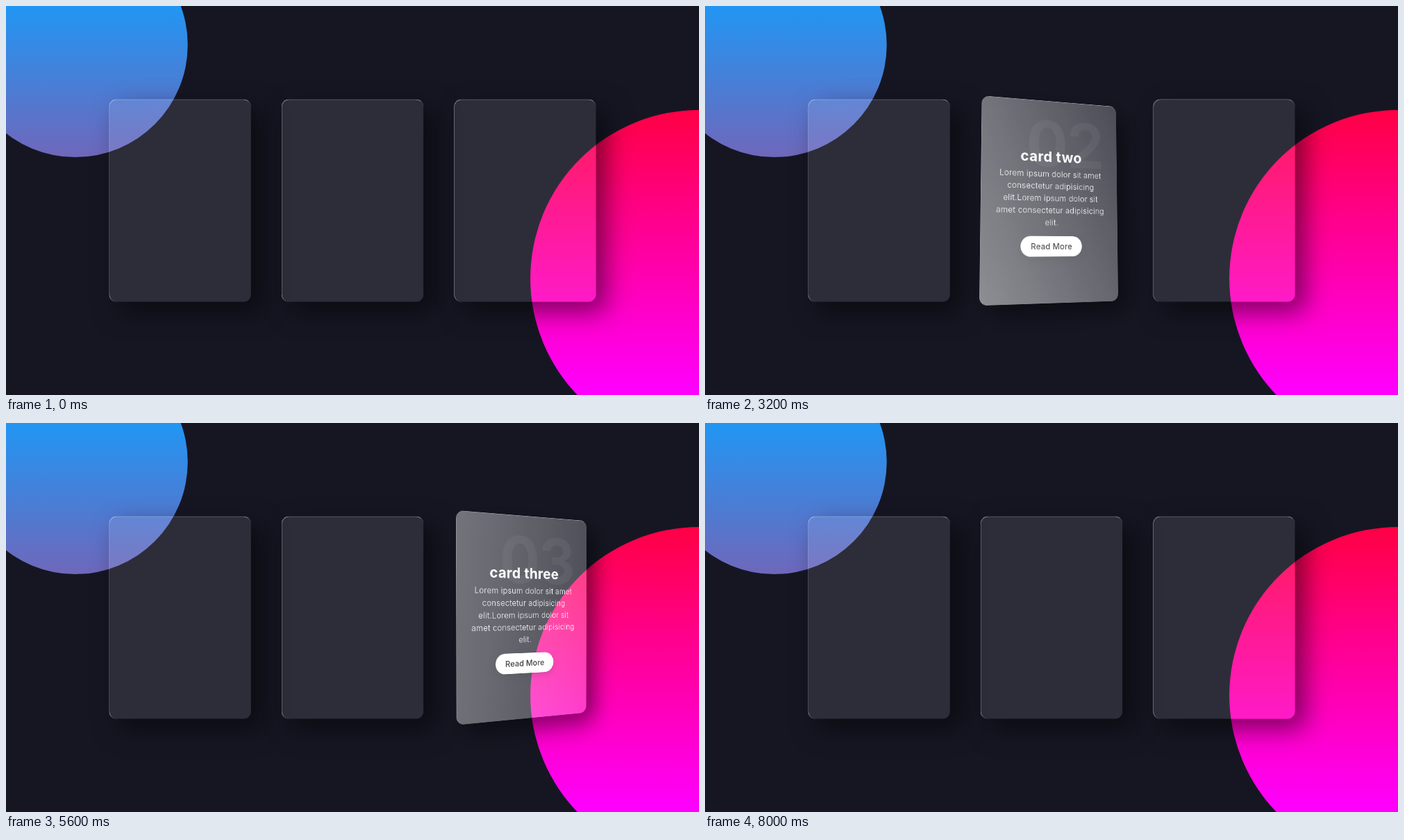
These frames come from a looping animation (998x561 px, 8.8 s). An HTML page:

```html
<!DOCTYPE html>
<html lang="en">
<head>
<meta charset="utf-8">
<title>Tilting glass cards</title>
<style>
  * { margin: 0; padding: 0; box-sizing: border-box; }
  html, body { width: 100%; height: 100%; overflow: hidden; background: #161623; }
  body { font-family: Inter, "Open Sans", sans-serif; }

  /* Laid out at 1366 x 768, shown at 998 x 561 */
  #stage {
    position: absolute; left: 0; top: 0; width: 1366px; height: 768px;
    transform: scale(calc(998 / 1366)); transform-origin: 0 0;
    display: flex; justify-content: center; align-items: center;
    background: #161623; overflow: hidden;
  }
  .disc { position: absolute; inset: 0; }
  .pink { background: linear-gradient(#f00, #f0f); clip-path: circle(30% at right 70%); }
  .blue { background: linear-gradient(#2196f3, #e91e63); clip-path: circle(20% at 10% 10%); }

  .card {
    position: relative; flex: none; width: 280px; height: 400px; margin: 30px;
    display: flex; justify-content: center; align-items: center;
    border-radius: 15px; background: rgba(255, 255, 255, .1);
    border-top: 1px solid rgba(255, 255, 255, .5);
    border-left: 1px solid rgba(255, 255, 255, .5);
    box-shadow: 20px 20px 50px rgba(0, 0, 0, .5);
  }
  .content { position: relative; width: 100%; padding: 20px 0; text-align: center; line-height: 1.5; white-space: nowrap; }
  h2 {
    position: absolute; top: -80px; right: 30px;
    font-size: 128px; font-weight: 700; letter-spacing: -.02em;
    color: rgba(255, 255, 255, .05);
  }
  h3 { position: relative; font-size: 28.8px; font-weight: 700; letter-spacing: .5px; color: #fff; }
  p { position: relative; font-size: 16px; font-weight: 300; line-height: 24px; letter-spacing: .3px; color: #fff; }
  .more {
    position: relative; display: inline-block; vertical-align: top;
    margin-top: 15px; padding: 8px 20px; border-radius: 20px;
    font-size: 16px; font-weight: 500; line-height: 24px; letter-spacing: .2px;
    color: #000; background: #fff; box-shadow: 0 5px 15px rgba(0, 0, 0, .2);
  }
  .glare { position: absolute; inset: 0; overflow: hidden; border-radius: 14px; }
  .glare i {
    position: absolute; left: 50%; top: 50%; width: 800px; height: 800px;
    transform-origin: 0 0; background: linear-gradient(0deg, rgba(255, 255, 255, 0), #fff);
  }
</style>
</head>
<body>
<div id="stage">
  <div class="disc pink"></div>
  <div class="disc blue"></div>
</div>
<script>
const STEP = 800, MAX_TILT = 25, WIDTH = 280, HEIGHT = 400;

// One pose per step: [card, tilt about x, tilt about y] in degrees, or null at rest
const poses = [
  null,
  [0, -5, 12], [0, 5, 4], [0, 16, -6],
  [1, 5, 16.4], [1, 3, -3], [1, -4.5, -23],
  [2, -1, 24], [2, 4, 6], [2, 4.5, -10.5],
  null
];

const stage = document.getElementById('stage');
const cards = ['one', 'two', 'three'].map((name, i) => {
  const card = document.createElement('div');
  card.className = 'card';
  card.innerHTML = `
    <div class="content">
      <h2>0${i + 1}</h2>
      <h3>card ${name}</h3>
      <p>Lorem ipsum dolor sit amet<br>consectetur adipisicing<br>elit.Lorem ipsum dolor sit<br>amet consectetur adipisicing<br>elit.</p>
      <span class="more">Read More</span>
    </div>
    <div class="glare"><i></i></div>`;
  stage.append(card);
  return {
    card,
    content: card.querySelector('.content'),
    glare: card.querySelector('.glare i')
  };
});

function tilt({ card, content, glare }, tiltX, tiltY) {
  // The pointer position follows from the tilt and aims the glare
  const x = -tiltY / (2 * MAX_TILT), y = tiltX / (2 * MAX_TILT);
  const angle = Math.atan2(x * WIDTH, -y * HEIGHT);
  card.style.transform = `perspective(1000px) rotateX(${tiltX}deg) rotateY(${tiltY}deg)`;
  content.style.opacity = 1;
  glare.style.transform = `rotate(${angle}rad) translate(-50%, -50%)`;
  glare.style.opacity = y + .5;
}

function rest({ card, content, glare }) {
  card.style.transform = 'none';
  content.style.opacity = glare.style.opacity = 0;
}

function draw(time) {
  const pose = poses[Math.floor(time / STEP) % poses.length];
  cards.forEach((parts, i) => {
    if (pose && pose[0] === i) tilt(parts, pose[1], pose[2]);
    else rest(parts);
  });
}

const start = performance.now();
function tick() {
  draw(performance.now() - start);
  requestAnimationFrame(tick);
}
tick();
</script>
</body>
</html>
```
